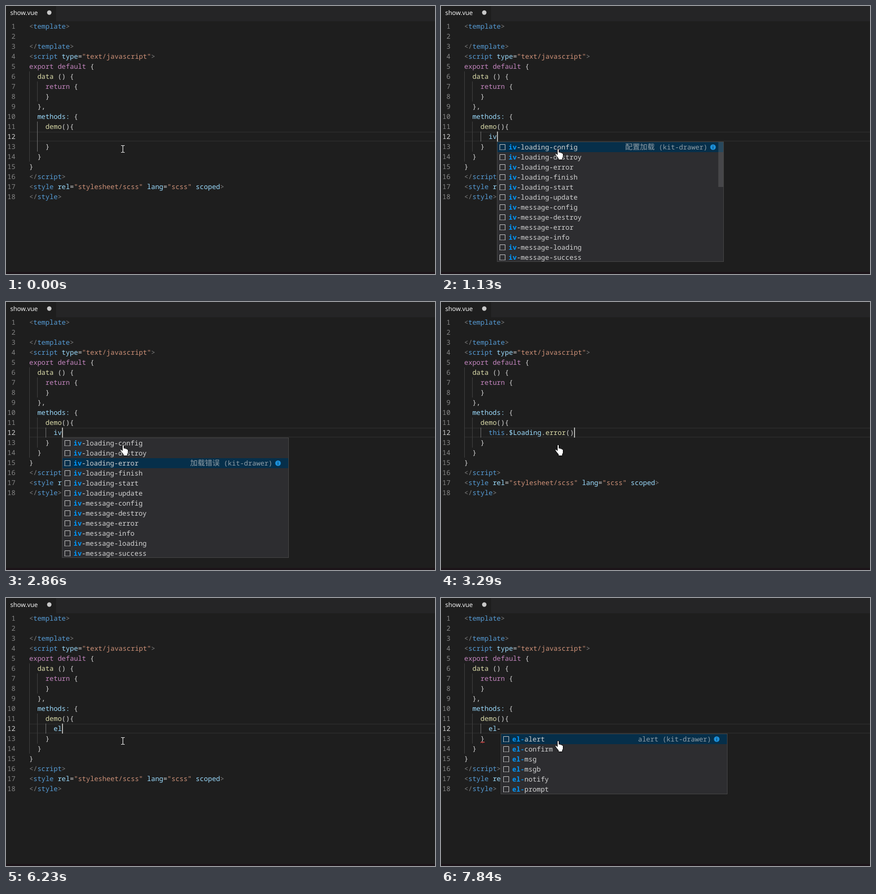
These frames come from a looping animation (813x508 px, 8 s). An HTML page:

```html
<!DOCTYPE html>
<html lang="en">
<head>
<meta charset="utf-8">
<title>Editor snippets</title>
<style>
  html, body { margin: 0; width: 100%; height: 100%; overflow: hidden; background: #1e1e1e; }
  svg { display: block; width: 813px; height: 508px; }
  text {
    font: 12.83px "Noto Sans Mono", "DejaVu Sans Mono", monospace;
    white-space: pre;
    text-rendering: geometricPrecision;
  }
  .tab { font: 12px "Open Sans", sans-serif; }
  .cjk { font: 14px "Noto Sans CJK SC", "Noto Sans CJK", sans-serif; }
  .hit { fill: #0097fb; font-weight: 700; }
</style>
</head>
<body>
<svg viewBox="0 0 813 508">
  <g id="base"></g>
  <g id="live"></g>
</svg>
<script>
const LOOP = 8000, CHAR = 7.7, ROW = 19, TOP = 29, LEFT = 44, CODE_X = LEFT + 6 * CHAR;

const COLORS = {
  g: '#808080', b: '#569cd6', a: '#9cdcfe', s: '#ce9178',
  k: '#c586c0', f: '#dcdcaa', w: '#d4d4d4'
};

// Each line: indent, then tokens led by a colour key.
const LINES = [
  [0, 'g<|btemplate|g>'],
  [0, ''],
  [0, 'g</|btemplate|g>'],
  [0, 'g<|bscript|a type|w=|s"text/javascript"|g>'],
  [0, 'kexport default|w {'],
  [2, 'fdata|w () {'],
  [4, 'kreturn|w {'],
  [4, 'w}'],
  [2, 'w},'],
  [2, 'amethods:|w {'],
  [4, 'fdemo|w(){'],
  [0, ''],
  [4, 'w}'],
  [2, 'w}'],
  [0, 'w}'],
  [0, 'g</|bscript|g>'],
  [0, 'g<|bstyle|a rel|w=|s"stylesheet/scss"|a lang|w=|s"scss"|a scoped|g>'],
  [0, 'g</|bstyle|g>']
];

const CALL = 'bthis|w.|a$Loading|w.|ferror|w()';
const HELPER = ' (kit-drawer)';

const LISTS = {
  iv: {
    x: 106, query: 'iv',
    items: ['loading-config', 'loading-destroy', 'loading-error', 'loading-finish',
      'loading-start', 'loading-update', 'message-config', 'message-destroy',
      'message-error', 'message-info', 'message-loading', 'message-success']
      .map(name => ['snippet', 'iv-' + name]),
    details: ['配置加载', '加载销毁', '加载错误'], helper: true
  },
  el: {
    x: 106, query: 'el',
    items: [['keyword', 'else'],
      ...['el-alert', 'el-confirm', 'el-msg', 'el-msgb', 'el-notify', 'el-prompt'].map(n => ['snippet', n]),
      ['variable', 'Element'], ['variable', 'ELOOP'], ['snippet', 'ecl'],
      ['method', 'eval'], ['method', 'equal']],
    details: ['else'], helper: false
  },
  dash: {
    x: 113, query: 'el-',
    items: ['alert', 'confirm', 'msg', 'msgb', 'notify', 'prompt'].map(n => ['snippet', 'el-' + n]),
    details: ['alert'], helper: true
  }
};

// Changes of state over time; each step keeps what it does not name.
const STEPS = [
  [0, { code: '', caret: false, deep: false, list: '', row: 0, thumb: [0, 0], hand: false,
        match: false, select: false, error: false }],
  [150, { caret: true }],
  [740, { code: 'ai' }],
  [870, { deep: true }],
  [1010, { code: 'aiv' }],
  [1130, { list: 'iv', hand: true, thumb: [85, 0.22] }],
  [1250, { thumb: [85, 0.1] }],
  [1380, { caret: false, thumb: [19, 0.22] }],
  [1920, { caret: true, thumb: [19, 0.16] }],
  [2190, { row: 1, thumb: [0, 0] }],
  [2320, { row: 2 }],
  [2460, { caret: false }],
  [2860, { caret: true }],
  [3290, { code: CALL, list: '' }],
  [3410, { hand: false, match: true }],
  [3840, { caret: false }],
  [4270, { caret: true }],
  [4830, { caret: false }],
  [5130, { select: true, match: false, deep: false, noGuide: true }],
  [5280, { select: false, noGuide: false, code: '', caret: true }],
  [5810, { caret: false }],
  [6090, { code: 'ae', caret: true, deep: true }],
  [6230, { code: 'ael' }],
  [6510, { list: 'el', row: 0, hand: true, thumb: [85, 0.22] }],
  [6630, { thumb: [19, 0.22] }],
  [6780, { caret: false }],
  [7180, { caret: true, thumb: [19, 0.16] }],
  [7450, { code: 'ael|w-', list: 'dash', thumb: [0, 0] }],
  [7840, { caret: false, error: true }]
];

let acc = {};
const STATES = STEPS.map(([at, change]) => ({ at, ...(acc = { ...acc, ...change }) }));

const esc = s => s.replace(/&/g, '&amp;').replace(/</g, '&lt;');
const rect = (x, y, w, h, fill, more = '') =>
  `<rect x="${x}" y="${y}" width="${w}" height="${h}" fill="${fill}" ${more}/>`;
const line = (d, color, more = '') => `<path d="${d}" fill="none" stroke="${color}" ${more}/>`;
const label = (x, y, body, more = '') => `<text x="${x}" y="${y}" ${more}>${body}</text>`;
const rowTop = n => TOP + ROW * (n - 1);
const guide = (x, from, to, color = '#404040') =>
  rect(x, rowTop(from), 1, ROW * (to - from + 1), color);

const tokens = src => src.split('|').map(t =>
  `<tspan fill="${COLORS[t[0]]}">${esc(t.slice(1))}</tspan>`).join('');
const length = src => src.split('|').reduce((n, t) => n + Math.max(0, t.length - 1), 0);

function drawBase() {
  let out = rect(0, 0, 813, 508, '#1e1e1e') + rect(95, 0, 718, 29, '#252526')
    + rect(0, 504, 813, 4, '#1c1419')
    + label(8, 17, 'show.vue', 'class="tab" fill="#fff"')
    + '<circle cx="82" cy="12.5" r="4.2" fill="#c8c8c8"/>'
    + rect(LEFT, 238, 769, 2, '#282828') + rect(LEFT, 255, 769, 2, '#282828')
    + guide(44, 6, 14) + guide(59, 7, 8);
  LINES.forEach(([indent, src], i) => {
    const y = rowTop(i + 1) + 14;
    out += label(18, y, i + 1, `text-anchor="end" fill="${i === 11 ? '#d0d0d0' : '#858585'}"`);
    if (src) out += label(LEFT + indent * CHAR, y, tokens(src));
  });
  return out;
}

const ICONS = {
  snippet: line('M4.5 14.5V4.5H14.5V14.5', '#c5c5c5')
    + line('M4 14.5H15', '#c5c5c5', 'stroke-dasharray="2 1"'),
  keyword: line('M3 5.5H9M11 5.5H16M3 8.5H11M12 8.5H14M3 11.5H7M9 11.5H16M3 14.5H12', '#c5c5c5'),
  variable: line('M6 5.5H3.5V13.5H6M13 5.5H15.5V13.5H13', '#c5c5c5')
    + '<path d="M6 9L10 6.5L13.5 8V10.5L9.5 12.5L6 11Z" fill="#75beff"/>',
  method: line('M9.5 3.5L14.7 6.3V12.3L9.5 15.3L4.3 12.3V6.3ZM4.3 6.3L9.5 9.3L14.7 6.3M9.5 9.3V15.3',
    '#b180d7', 'stroke-width="1.2"')
};

// Marks the typed letters inside a suggestion.
function marked(name, query) {
  let n = 0;
  return [...name].map(c => {
    const hit = n < query.length && c.toLowerCase() === query[n];
    if (hit) n++;
    return hit ? `<tspan class="hit">${c}</tspan>` : c;
  }).join('');
}

function detail(list, row) {
  const text = list.details[row], wide = /[^\x00-\x7f]/.test(text);
  const body = (wide ? `<tspan class="cjk">${text}</tspan>` : text) + (list.helper ? HELPER : '');
  const y = ROW * row + 14;
  let out = label(list.helper ? 398 : 418, y, body, 'text-anchor="end" fill="#d4d4d4" opacity=".68"');
  if (list.helper) {
    out += `<circle cx="408.5" cy="${y - 4.5}" r="5.3" fill="#1c8fd8"/>`
      + rect(408, y - 5.5, 1, 4, '#062f4a') + rect(408, y - 7.5, 1, 1, '#062f4a');
  }
  return out;
}

function drawList(s) {
  const list = LISTS[s.list], h = Math.min(226, list.items.length * ROW - 1);
  let out = rect(0, 0, 428, h, '#2d2d30') + rect(0, s.row * ROW, 428, ROW, '#062f4a');
  list.items.forEach(([icon, name], i) => {
    out += `<g transform="translate(0 ${i * ROW})">${ICONS[icon]}`
      + label(21, 14, marked(name, list.query), 'fill="#d4d4d4"') + '</g>';
  });
  out += detail(list, s.row) + rect(418.5, 0, 9.5, s.thumb[0], '#a0a0a0', `opacity="${s.thumb[1]}"`);
  return `<clipPath id="clip"><rect width="428" height="${h}"/></clipPath>`
    + `<g transform="translate(${list.x + 1} 258)"><g clip-path="url(#clip)">${out}</g>`
    + `<rect x="-.5" y="-.5" width="429" height="${h + 1}" fill="none" stroke="#454545"/></g>`;
}

const HAND = '<path transform="translate(216 270)" fill="#fff" stroke="#000" stroke-linejoin="round" '
  + 'd="M4.5 2Q4.5.5 6 .5T7.5 2V7.2Q10 6.6 10.5 8Q12.8 7.4 13.2 9Q15.5 8.8 15.5 11V15Q15.5 17 14 18.5V21.5'
  + 'H6.5V19L2.5 14Q.5 11.5 .5 10.5Q1.5 8.8 3.2 10.2L4.5 11.8Z"/>';
const BEAM = line('M218 264.5H220.5L221.5 265.5L222.5 264.5H225M221.5 265V277'
  + 'M218 277.5H220.5L221.5 276.5L222.5 277.5H225', '#e4e4e4', 'stroke-width="1.2"');

function drawLive(s) {
  const end = CODE_X + length(s.code) * CHAR;
  const active = '#707070';
  let out = guide(59, 11, 13, s.deep || s.noGuide ? '#404040' : active);
  if (s.code) out += guide(75, 12, 12, s.deep ? active : '#404040');
  if (s.select) out += rect(CODE_X, 238, end - CODE_X, ROW, '#264f78');
  if (s.match) {
    [236.5, 244.5].forEach(x => {
      out += `<rect x="${x}" y="238.5" width="7" height="18" fill="#0064001a" stroke="#888"/>`;
    });
  }
  if (s.code) out += label(CODE_X, 252, tokens(s.code));
  if (s.caret) out += rect(Math.round(end), 238, 2, ROW, '#aeafad');
  if (s.error) out += line('M75 274.5L77 272.5L79 274.5L81 272.5L82.5 274', '#e04848', 'stroke-width="1.1"');
  if (s.list) out += drawList(s);
  return out + (s.hand ? HAND : BEAM);
}

const live = document.getElementById('live');
let shown = null;

function tick() {
  const t = performance.now() % LOOP;
  const state = STATES.filter(s => s.at <= t).pop();
  if (state !== shown) {
    shown = state;
    live.innerHTML = drawLive(state);
  }
  requestAnimationFrame(tick);
}

document.getElementById('base').innerHTML = drawBase();
tick();
</script>
</body>
</html>
```
